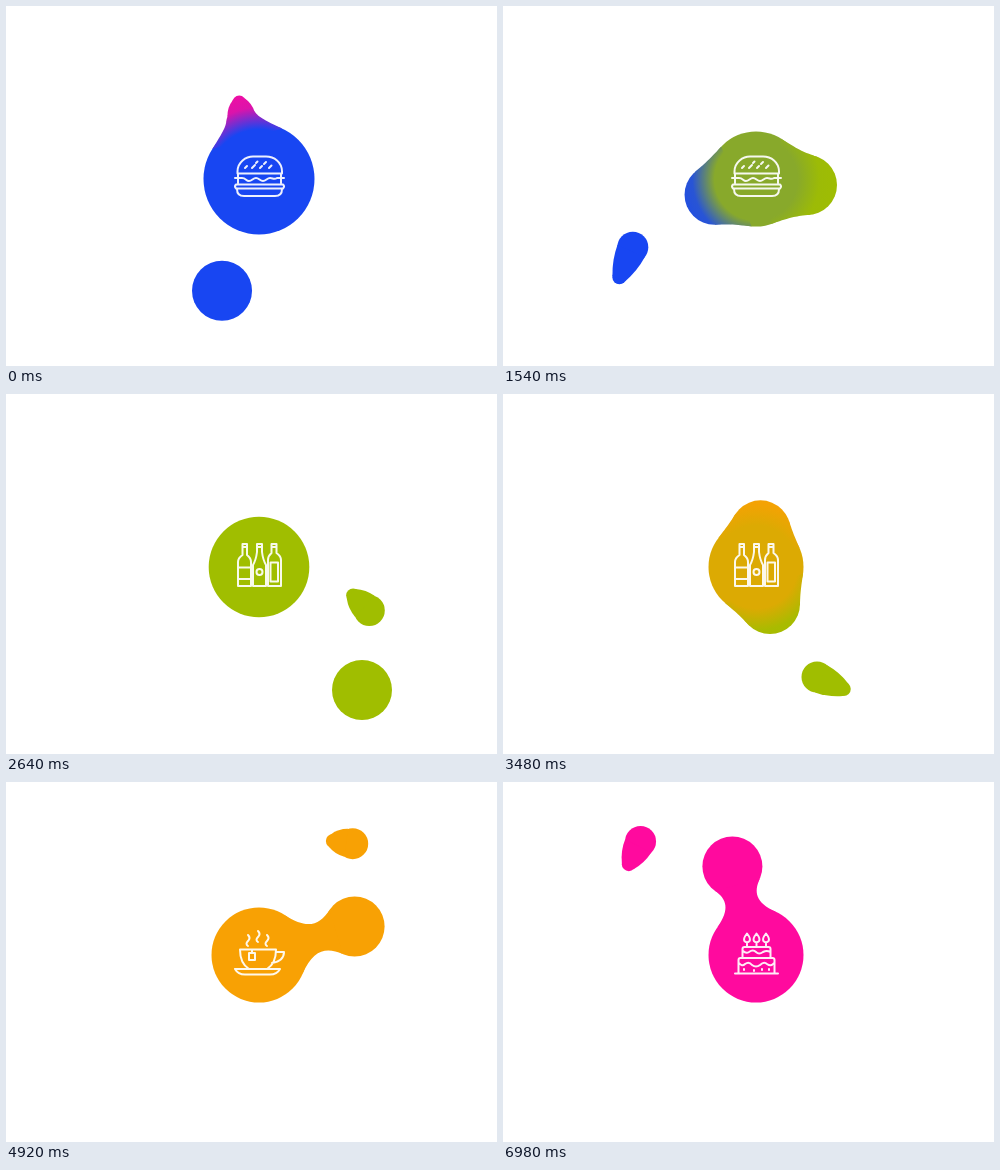
Write an HTML page with a canvas that moves like this. It is 491 by 360 pixels and loops after 7000 ms.

```html
<!DOCTYPE html>
<html lang="en">
<head>
<meta charset="utf-8">
<title>Liquid menu</title>
<style>
  html, body { margin: 0; width: 100%; height: 100%; overflow: hidden; background: #fff; }
  canvas { display: block; width: 491px; height: 360px; }
</style>
</head>
<body>
<canvas id="stage" width="491" height="360"></canvas>
<script>
const ctx = document.getElementById('stage').getContext('2d');
const CX = 253, CY = 173, LOOP = 7000;
const BLUE = [24, 70, 242], GREEN = [160, 190, 0], ORANGE = [248, 161, 4], PINK = [255, 10, 158];

// One petal of the orbit, [step, x, y] around the centre, leaving to the right and returning from below.
const ORBIT = [
  [-6, 0, 0], [0, 51, 6], [4, 76, 17], [9, 105, 38], [16, 135, 80],
  [23, 103, 123], [28, 61, 110], [32, 28, 90], [41, 14, 37], [47, 0, 0]
];

// turn: quarter turns clockwise, sx/sy: size of the petal
const petals = [
  { start: -51, turn: 2, sx: .95, sy: 1.05, color: PINK, icon: 'cake' },
  { start: -8, turn: 1, sx: 1.12, sy: 1.12, color: BLUE, icon: 'burger' },
  { start: 33, turn: 0, sx: 1, sy: 1, color: GREEN, icon: 'bottles' },
  { start: 75, turn: 3, sx: .85, sy: 1, color: ORANGE, icon: 'cup' },
  { start: 116, turn: 2, sx: .95, sy: 1.05, color: PINK, icon: 'cake' }
];

const flame = x => `M${x} 151.500q-4 5 -2.600 7.500q2.600 2.500 5.200 0q1.400 -2.500 -2.600 -7.500zM${x} 161v4`;
const steam = (x, y) => `M${x} ${y}q3 3 0 6t0 5`;
const icons = {
  burger: 'M231.500 167.500v-2C231.500 156 240 150.500 247 150.500h13C268 150.500 276 156 276 165.500v2z' +
    'M239 162l2 -2M246 162l3 -3M250 157l1.500 -1.500M254 162l2 -2M258 158l2 -2M263 162l2.500 -2.500' +
    'M229 172h7c4 0 4 3 7 3s4 -3 7 -3s4 3 7 3s4 -3 7 -3s4 2 7 0h7' +
    'M232 168v9M275 168v9M230 178.500h47q2 2 0 4h-47q-2 -2 0 -4z' +
    'M231 183q0 7 7 7h31q7 0 7 -7',
  bottles: 'M236.500 150h4.500v11q4 3 4 7v24h-13v-24q0 -4 4.500 -7zM236.500 153h4.500M232 173.500h13M232 185h13' +
    'M251 150h5v8q1 8 4 13v21h-13v-21q3 -5 4 -13zM251 153h5M256.500 178a3 3 0 1 1 -6 0a3 3 0 1 1 6 0' +
    'M265.500 150h5v9q4.500 3 4.500 7v26h-13v-26q0 -4 3.500 -7zM265.500 153h5M264.500 168.500h7.500v19h-7.500z',
  cup: 'M234 167.500h36q0 14 -9 19.500h-18q-9 -5.500 -9 -19.500z' +
    'M270 170h8q0 9 -12 11M229 187h45q-3 5.500 -10 5.500h-25q-7 0 -10 -5.500z' +
    'M246 168v3M243 171h6v7h-6z' + steam(242, 153) + steam(252, 149) + steam(261, 153),
  cake: 'M232 191.500h43M235.500 191v-13q0 -2 2 -2h32q2 0 2 2v13' +
    'M236 181q3 4 6 1q4 -3 7 1q4 3 8 0q4 -4 7 -1q4 3 7 -1' +
    'M239.500 176v-9q0 -2 2 -2h24q2 0 2 2v9M240 169q3 3 6 1q4 -3 7 0t7 0q4 -2 7 0' +
    'M241 187v1M251 188v1M259 187v1M266 187v1' + flame(244) + flame(253.5) + flame(263)
};
for (const name in icons) icons[name] = new Path2D(icons[name]);

const clamp = v => Math.min(1, Math.max(0, v));
const ramp = (a, b, v) => clamp((v - a) / (b - a));
const smooth = (a, b, v) => { const u = ramp(a, b, v); return u * u * (3 - 2 * u); };
const rgba = (c, a = 1) => `rgba(${c.map(Math.round)},${a})`;
const polar = (c, angle, r) => [c.x + Math.cos(angle) * r, c.y + Math.sin(angle) * r];

function orbitAt(t) {
  const last = ORBIT.length - 1;
  if (t <= ORBIT[0][0] || t >= ORBIT[last][0]) return [0, 0];
  const i = ORBIT.findIndex(k => k[0] > t) - 1;
  const a = ORBIT[i], b = ORBIT[i + 1], span = b[0] - a[0], u = (t - a[0]) / span;
  const slope = (k, axis) => {
    const p = ORBIT[Math.max(0, k - 1)], q = ORBIT[Math.min(last, k + 1)];
    return (q[axis] - p[axis]) / (q[0] - p[0]) * span;
  };
  return [1, 2].map(axis =>
    (2 * u ** 3 - 3 * u * u + 1) * a[axis] + (u ** 3 - 2 * u * u + u) * slope(i, axis) +
    (3 * u * u - 2 * u ** 3) * b[axis] + (u ** 3 - u * u) * slope(i + 1, axis));
}

function bodyAt(petal, t, r) {
  let [x, y] = orbitAt(t);
  x *= petal.sx;
  y *= petal.sy;
  for (let i = 0; i < petal.turn; i++) [x, y] = [-y, x];
  return { x: CX + x, y: CY + y, r };
}

function disc(c) {
  ctx.beginPath();
  ctx.arc(c.x, c.y, c.r, 0, 2 * Math.PI);
  ctx.fill();
}

// Liquid neck between two circles; the deeper they overlap, the wider it spreads
function neck(a, b) {
  const d = Math.hypot(b.x - a.x, b.y - a.y), sum = a.r + b.r;
  if (d > sum + 28 || d <= Math.abs(a.r - b.r)) return;
  let u1 = 0, u2 = 0;
  if (d < sum) {
    u1 = Math.acos((a.r ** 2 + d * d - b.r ** 2) / (2 * a.r * d));
    u2 = Math.acos((b.r ** 2 + d * d - a.r ** 2) / (2 * b.r * d));
  }
  const dir = Math.atan2(b.y - a.y, b.x - a.x), tangent = Math.acos((a.r - b.r) / d);
  const spread = .5 + .4 * ramp(0, b.r, sum - d);
  const s1 = u1 + (tangent - u1) * spread;
  const s2 = Math.PI - u2 - (Math.PI - u2 - tangent) * spread;
  const side = sign => {
    const a1 = dir + sign * s1, a2 = dir + sign * s2;
    const p = polar(a, a1, a.r), q = polar(b, a2, b.r);
    const len = Math.min(1.2, Math.hypot(p[0] - q[0], p[1] - q[1]) / sum) * Math.min(1, 2 * d / sum);
    const handle = (pt, angle, r) => polar({ x: pt[0], y: pt[1] }, angle, r * len);
    return [p, handle(p, a1 - sign * Math.PI / 2, a.r), handle(q, a2 + sign * Math.PI / 2, b.r), q];
  };
  const l = side(1), r = side(-1);
  ctx.beginPath();
  ctx.moveTo(...l[0]);
  ctx.bezierCurveTo(...l[1], ...l[2], ...l[3]);
  ctx.lineTo(...r[3]);
  ctx.bezierCurveTo(...r[2], ...r[1], ...r[0]);
  ctx.fill();
}

// Slightly bulging join of the drop and its tail
function hull(a, b) {
  const d = Math.hypot(b.x - a.x, b.y - a.y);
  if (d <= Math.abs(a.r - b.r)) return;
  const dir = Math.atan2(b.y - a.y, b.x - a.x), s = Math.acos((a.r - b.r) / d);
  const mid = { x: (a.x + b.x) / 2, y: (a.y + b.y) / 2 }, bulge = (a.r + b.r) / 2 + 3;
  ctx.beginPath();
  ctx.moveTo(...polar(a, dir + s, a.r));
  ctx.quadraticCurveTo(...polar(mid, dir + s, bulge), ...polar(b, dir + s, b.r));
  ctx.lineTo(...polar(b, dir - s, b.r));
  ctx.quadraticCurveTo(...polar(mid, dir - s, bulge), ...polar(a, dir - s, a.r));
  ctx.fill();
}

function drawPetal(petal, step, core) {
  const t = step - petal.start;
  if (t < -6 || t > 64) return;
  const ball = bodyAt(petal, t, 30), drop = bodyAt(petal, t - 13, 15.5), tail = bodyAt(petal, t - 16, 7);
  ctx.fillStyle = rgba(petal.color);
  for (const body of [ball, drop, tail]) {
    disc(body);
    neck(core, body);
  }
  hull(drop, tail);
}

function drawCore(core, color) {
  const edge = core.r + 45;
  const glow = ctx.createRadialGradient(CX, CY, 0, CX, CY, edge);
  glow.addColorStop(0, rgba(color));
  glow.addColorStop((core.r - 6) / edge, rgba(color));
  glow.addColorStop((core.r + 16) / edge, rgba(color, .15));
  glow.addColorStop(1, rgba(color, 0));
  ctx.globalCompositeOperation = 'source-atop';
  ctx.fillStyle = glow;
  disc({ x: CX, y: CY, r: edge });
  ctx.globalCompositeOperation = 'source-over';
}

function drawIcon(name, alpha) {
  ctx.globalAlpha = alpha * .92;
  ctx.stroke(icons[name]);
  ctx.globalAlpha = 1;
}

function draw(step) {
  const k = petals.findLastIndex(p => step >= p.start - 6);
  const now = petals[k], before = petals[Math.max(0, k - 1)], t = step - now.start;
  const mix = ramp(-6, 1.3, t);
  const color = now.color.map((v, i) => before.color[i] + (v - before.color[i]) * mix);
  const core = { x: CX, y: CY, r: 47.5 + 8 * smooth(1, 7, t) * (1 - smooth(14, 29, t)) };

  ctx.clearRect(0, 0, 491, 360);
  ctx.fillStyle = rgba(color);
  disc(core);
  for (const petal of petals) drawPetal(petal, step, core);
  drawCore(core, color);

  ctx.strokeStyle = '#fff';
  ctx.lineWidth = 2;
  ctx.lineCap = ctx.lineJoin = 'round';
  const swap = ramp(1, 6, t);
  if (swap < 1) drawIcon(before.icon, 1 - swap);
  if (swap > 0) drawIcon(now.icon, swap);
}

// Steps come in uneven threes: 20, 100 and 20 ms.
function stepAt(ms) {
  const rest = ms % 140;
  return 3 * Math.floor(ms / 140) + (rest >= 20) + (rest >= 120);
}

function tick() {
  draw(stepAt(performance.now() % LOOP));
  requestAnimationFrame(tick);
}
tick();
</script>
</body>
</html>
```
